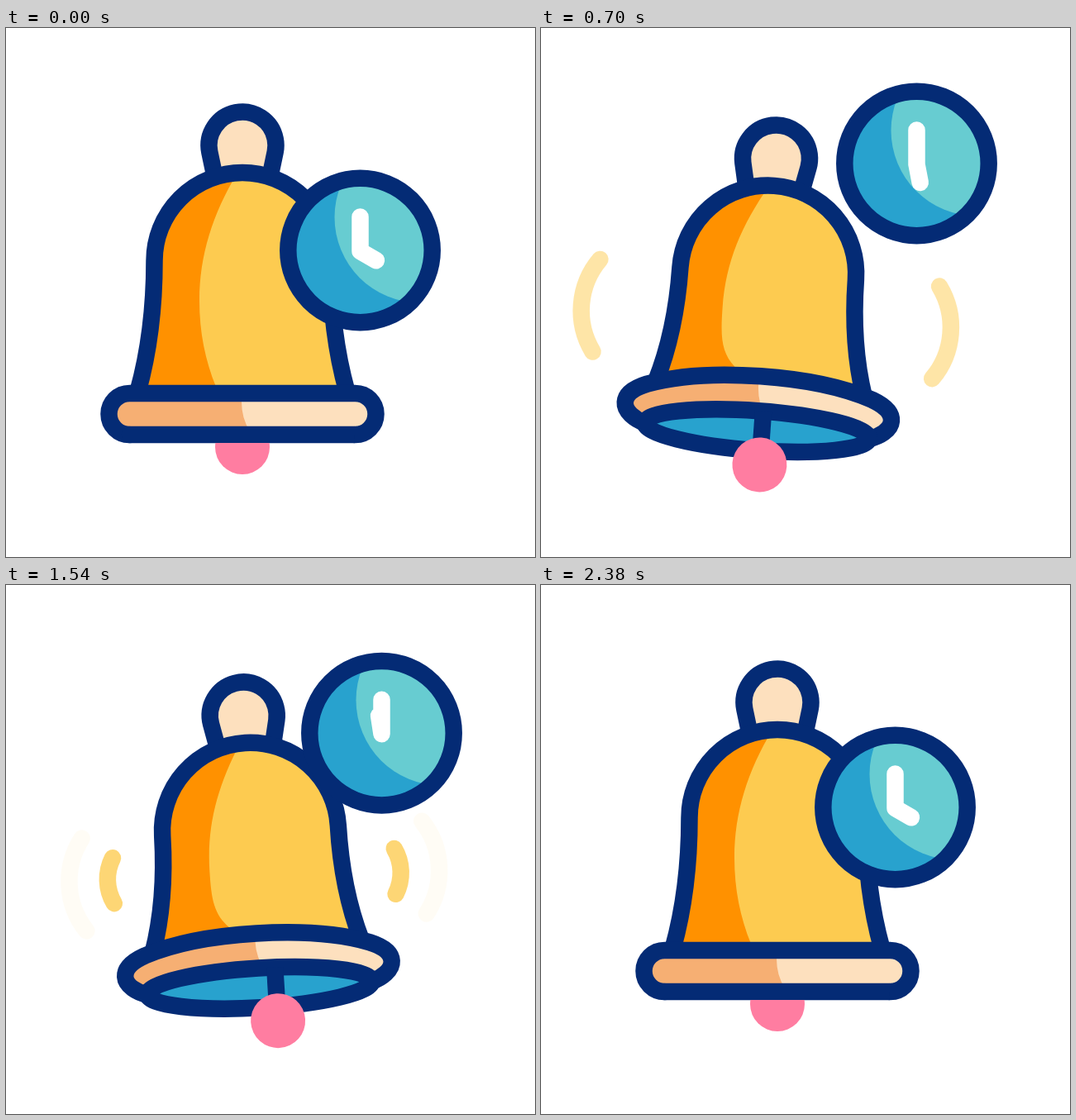
Recreate the animation shown at these times as an HTML page with a canvas. Size 640 by 640 pixels, loop 2400 ms.

```html
<!DOCTYPE html>
<html lang="en">
<head>
<meta charset="utf-8">
<title>Ringing bell</title>
<style>
html, body { margin: 0; width: 100%; height: 100%; overflow: hidden; background: #fff; }
canvas { display: block; width: 640px; height: 640px; }
</style>
</head>
<body>
<canvas id="stage" width="640" height="640"></canvas>
<script>
const c = document.getElementById('stage').getContext('2d');
const LOOP = 2400, BEAT = 238.5, SWING = 6, LINE = 20.5, RAD = Math.PI / 180;
const FIRST = 428.5, LAST = FIRST + 6.5 * BEAT;
const NAVY = '#042b75', YELLOW = '#fdcb50', ORANGE = '#ff9100', CREAM = '#fde0be',
  PEACH = '#f6af73', BLUE = '#28a2ce', TEAL = '#67ccd1', PINK = '#ff7da1';

const clamp = x => Math.max(0, Math.min(1, x));
const ramp = (t, a, b) => clamp((t - a) / (b - a));
const smooth = (t, a, b) => { const s = ramp(t, a, b); return s * s * (3 - 2 * s); };
const quad = (t, a, b) => {
  const s = ramp(t, a, b);
  return s < .5 ? 2 * s * s : 1 - 2 * (1 - s) ** 2;
};

// Swing angle in degrees: wind up, beat between both sides, settle.
function swing(t) {
  if (t < FIRST) return SWING * quad(t, 236, FIRST);
  if (t > LAST) return -SWING * (1 - smooth(t, LAST, 2200));
  const half = BEAT / 2, n = Math.floor((t - FIRST) / half);
  return SWING * (n % 2 ? -1 : 1) * (1 - 2 * quad(t, FIRST + n * half, FIRST + (n + 1) * half));
}

const openness = t => smooth(t, 180, 610) - smooth(t, 1970, 2220);

function clockPos(t) {
  const away = smooth(t, 0, 420) - smooth(t, 1990, 2380);
  const lift = smooth(t, 400, 600) - smooth(t, 600, 800) + smooth(t, 800, 1000) - smooth(t, 1000, 1200);
  return [428.5 + 26 * away, 269 - 89.8 * away - 31 * lift];
}

const HAND = [[240, 120], [700, 169], [1020, 230], [1540, 351], [1980, 454], [2240, 480]];
function handAngle(t) {
  const last = HAND.length - 1;
  if (t <= HAND[0][0]) return HAND[0][1];
  if (t >= HAND[last][0]) return HAND[last][1];
  const slope = i => i === 0 || i === last ? 0
    : (HAND[i + 1][1] - HAND[i - 1][1]) / (HAND[i + 1][0] - HAND[i - 1][0]);
  let i = 0;
  while (t > HAND[i + 1][0]) i++;
  const [t0, a] = HAND[i], [t1, b] = HAND[i + 1], d = t1 - t0, s = (t - t0) / d;
  return a + (b - a) * s * s * (3 - 2 * s)
    + d * s * (1 - s) * (slope(i) * (1 - s) - slope(i + 1) * s);
}

function stroke(path, color = NAVY) {
  c.strokeStyle = color;
  c.lineWidth = LINE;
  c.stroke(path);
}

function fill(path, color) {
  c.fillStyle = color;
  c.fill(path);
}

function clipped(path, draw) {
  c.save();
  c.clip(path);
  draw();
  c.restore();
}

function disc(x, y, r) {
  const p = new Path2D();
  p.arc(x, y, r, 0, 2 * Math.PI);
  return p;
}

function waves(half, r, spread, tilt, alpha) {
  if (alpha <= 0) return;
  c.save();
  c.translate(1.5, 352.5);
  c.rotate(tilt * RAD);
  c.globalAlpha = alpha;
  c.lineCap = 'round';
  for (const side of [0, Math.PI]) {
    const p = new Path2D(), a = spread * RAD;
    p.arc(side ? r - half : half - r, 0, r, side - a, side + a);
    stroke(p, YELLOW);
  }
  c.restore();
}

function drawWaves(t) {
  for (let n = 0; n < 7; n++) {
    const p = t - 300 - n * 240;
    waves(177.5, 57, 28.8, 1.5, smooth(p, -30, -6) - smooth(p, 20, 90));
    waves(224, 96, 35.7, .5, smooth(p, 36, 70) - smooth(p, 66, 256));
  }
}

function drawHandle(k) {
  const dy = 16 * k, p = new Path2D();
  p.moveTo(-33, 182 + dy);
  p.arc(0, 142 + dy, 40.5, Math.PI - .2, .2);
  p.lineTo(33, 182 + dy);
  fill(p, CREAM);
  stroke(p);
}

function drawBody(k) {
  const dy = 16 * k, mid = 281.5 + dy, foot = 440 - 2 * k, p = new Path2D();
  p.moveTo(-126.5, foot);
  p.bezierCurveTo(-114, 395 + 4 * k, -106.5, 340 + 12 * k, -106.5, mid);
  p.arc(0, mid, 106.5, Math.PI, 0);
  p.bezierCurveTo(106.5, 340 + 12 * k, 114, 395 + 4 * k, 126.5, foot);
  fill(p, YELLOW);
  clipped(p, () => {
    const s = new Path2D(), end = 434 - 21 * k;
    s.moveTo(-6, 175 + dy);
    s.bezierCurveTo(-36, 225 + dy, -52, 275 + 12 * k, -52, 330 + 12 * k);
    s.bezierCurveTo(-52, 368 + 10 * k, -45 - 5 * k, 402 - 6 * k, -32, end);
    s.lineTo(-32, 450);
    s.lineTo(-200, 450);
    s.lineTo(-200, 160);
    fill(s, ORANGE);
  });
  stroke(p);
}

function drawRim(k) {
  const tip = 492 - 4 * k, side = 467 - 2 * k, edge = 442 - k, top = 442 - 20 * k;
  const p = new Path2D();
  p.moveTo(-136.5, tip);
  p.bezierCurveTo(-150.3 + 2.3 * k, 492 - 7 * k, -161.5, 480.8 - 4.8 * k, -161.5, side);
  p.bezierCurveTo(-161.5, 453.2 + .8 * k, -150.3 - 1.7 * k, 442 + 5 * k, -136.5, edge);
  p.bezierCurveTo(-100, 442 - 14 * k, -50, top, 0, top);
  p.bezierCurveTo(50, top, 100, 442 - 14 * k, 136.5, edge);
  p.bezierCurveTo(150.3 + 1.7 * k, 442 + 5 * k, 161.5, 453.2 + .8 * k, 161.5, side);
  p.bezierCurveTo(161.5, 480.8 - 4.8 * k, 150.3 - 2.3 * k, 492 - 7 * k, 136.5, tip);
  fill(p, CREAM);
  clipped(p, () => {
    const s = new Path2D(), y = top + 10;
    s.moveTo(-1 - k, y - 20);
    s.lineTo(-1 - k, y);
    s.quadraticCurveTo(-1 - k, y + 20, 9 - k, y + 36);
    s.lineTo(-200, y + 60);
    s.lineTo(-200, y - 20);
    fill(s, PEACH);
  });
  c.lineCap = 'round';
  stroke(p);
  c.lineCap = 'butt';

  const mouth = new Path2D();
  mouth.ellipse(0, tip, 136, Math.max(.1, 24 * k), 0, 0, 2 * Math.PI);
  fill(mouth, BLUE);
  stroke(mouth);
  return mouth;
}

function drawClapper(k, angle, mouth) {
  const x = k * (13.6 - 1.85 * angle), y = 507 + 22 * k;
  clipped(mouth, () => {
    const rod = new Path2D();
    rod.moveTo(x, 450);
    rod.lineTo(x, y);
    stroke(rod);
  });
  const below = new Path2D();
  below.rect(-300, 502 - 22 * k, 600, 200);
  clipped(below, () => fill(disc(x, y, 33), PINK));
}

function drawClock(t) {
  const face = disc(0, 0, 87.2);
  c.save();
  c.translate(...clockPos(t));
  fill(face, BLUE);
  clipped(face, () => fill(disc(72.5, -40, 103.5), TEAL));
  stroke(face);
  const a = handAngle(t) * RAD, hands = new Path2D();
  hands.moveTo(0, -40.5);
  hands.lineTo(0, 1);
  hands.lineTo(22.5 * Math.sin(a), 1 - 22.5 * Math.cos(a));
  c.lineCap = c.lineJoin = 'round';
  stroke(hands, '#fff');
  c.restore();
}

function draw(t) {
  const angle = swing(t), k = openness(t);
  c.fillStyle = '#fff';
  c.fillRect(0, 0, 640, 640);
  c.save();
  c.translate(286, 137);
  c.rotate(angle * RAD);
  c.translate(0, -137);
  drawWaves(t);
  drawHandle(k);
  drawBody(k);
  drawClapper(k, angle, drawRim(k));
  c.restore();
  drawClock(t);
}

const start = performance.now();
function tick() {
  draw((performance.now() - start) % LOOP);
  requestAnimationFrame(tick);
}
tick();
</script>
</body>
</html>
```
